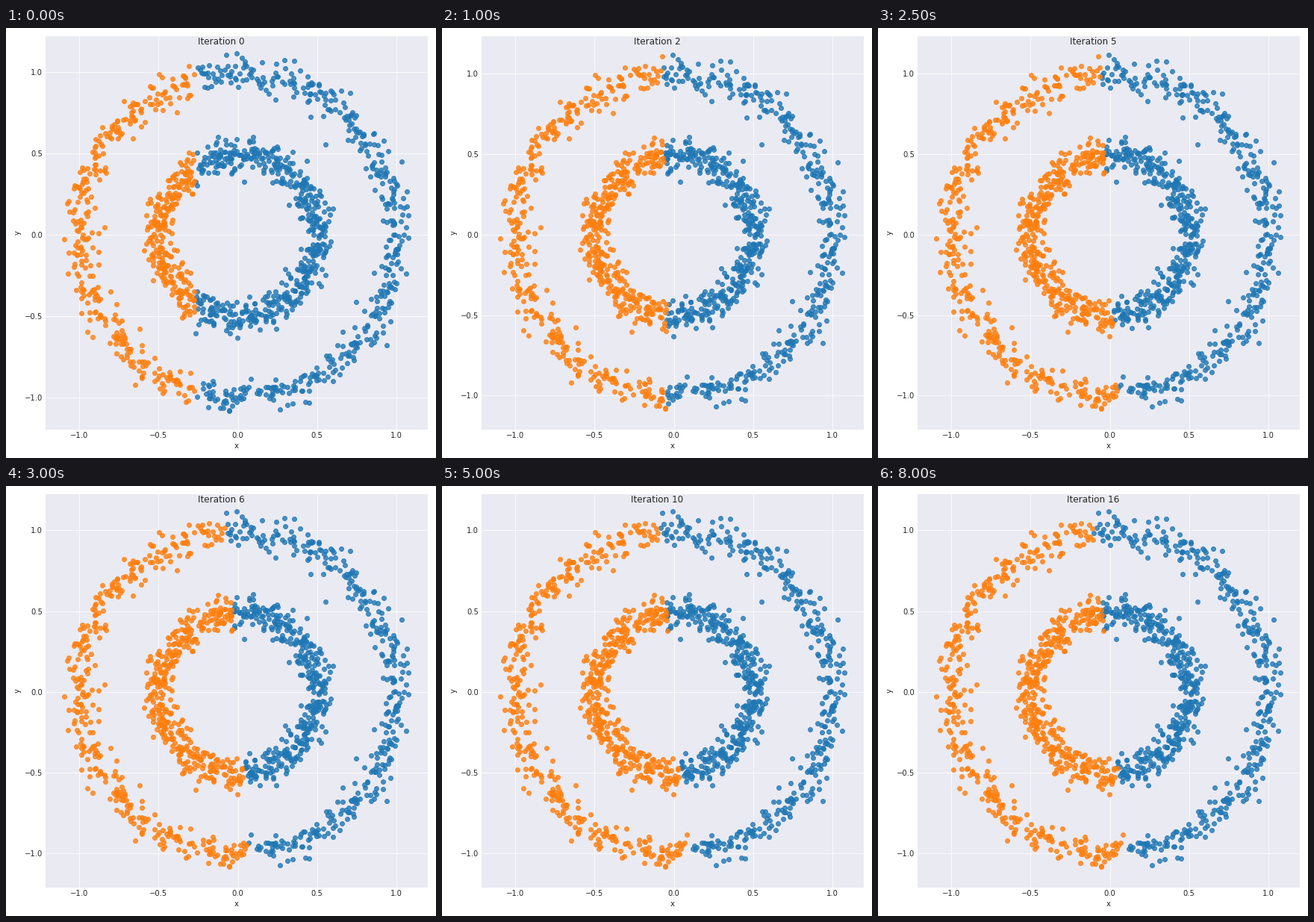
Write a matplotlib script that moves like this. It is 576 px wide and 576 px high and loops after 8.5 s.

```python
import numpy as np
import matplotlib.pyplot as plt
from matplotlib.animation import FuncAnimation
from matplotlib.ticker import MultipleLocator

SIZE, DPI = 576, 72
STEPS, STEP_MS = 17, 500
COUNT, NOISE = 1500, .05
BLUE, ORANGE = "#1f77b4", "#ff7f0e"
INK, PANEL = "#262626", "#eaeaf2"

plt.rcParams.update({
    "font.family": "DejaVu Sans", "font.size": 10,
    "text.color": INK, "axes.labelcolor": INK,
    "xtick.color": INK, "ytick.color": INK,
})


def noisy_rings(rng):
    """Two evenly spaced rings, shuffled, then blurred with noise."""
    angle = np.linspace(0, 2 * np.pi, COUNT // 2, endpoint=False)
    circle = np.column_stack([np.cos(angle), np.sin(angle)])
    rings = np.vstack([circle, .5 * circle])
    order = np.arange(COUNT)
    rng.shuffle(order)
    return rings[order] + rng.normal(scale=NOISE, size=rings.shape)


def divider(step):
    """Offset and tilt of the line between the two clusters."""
    offset = -.266 * .45 ** step
    tilt = .105 * (1 - np.exp(-(step / 5.8) ** 2))
    return offset, tilt


def y_limits(step):
    if step < 2:
        return -1.194, 1.2224
    if step < 6:
        return -1.21, 1.232
    return -1.209, 1.2249


points = noisy_rings(np.random.RandomState(0))

fig, ax = plt.subplots(figsize=(SIZE / DPI, SIZE / DPI), dpi=DPI,
                       facecolor="white")
ax.set(facecolor=PANEL, xlabel="x", ylabel="y",
       xlim=(-1.2145, 1.1985), ylim=y_limits(0))
ax.set_axisbelow(True)
ax.grid(color="white", linewidth=.8)
ax.tick_params(length=0)
for axis in (ax.xaxis, ax.yaxis):
    axis.set_major_locator(MultipleLocator(.5))
    axis.set_major_formatter("{x:.1f}")
for spine in ax.spines.values():
    spine.set_visible(False)
fig.tight_layout()

blue = ax.scatter([], [], s=36, color=BLUE, alpha=.8)
orange = ax.scatter([], [], s=36, color=ORANGE, alpha=.8)
title = fig.suptitle("Iteration 0", fontsize=12)


def draw(step):
    offset, tilt = divider(step)
    x, y = points.T
    is_left = x < offset - tilt * y
    orange.set_offsets(points[is_left])
    blue.set_offsets(points[~is_left])
    ax.set_ylim(*y_limits(step))
    title.set_text(f"Iteration {step}")
    return blue, orange, title


anim = FuncAnimation(fig, draw, frames=STEPS, interval=STEP_MS,
                     repeat=True, repeat_delay=0, blit=False)
plt.show()
```
